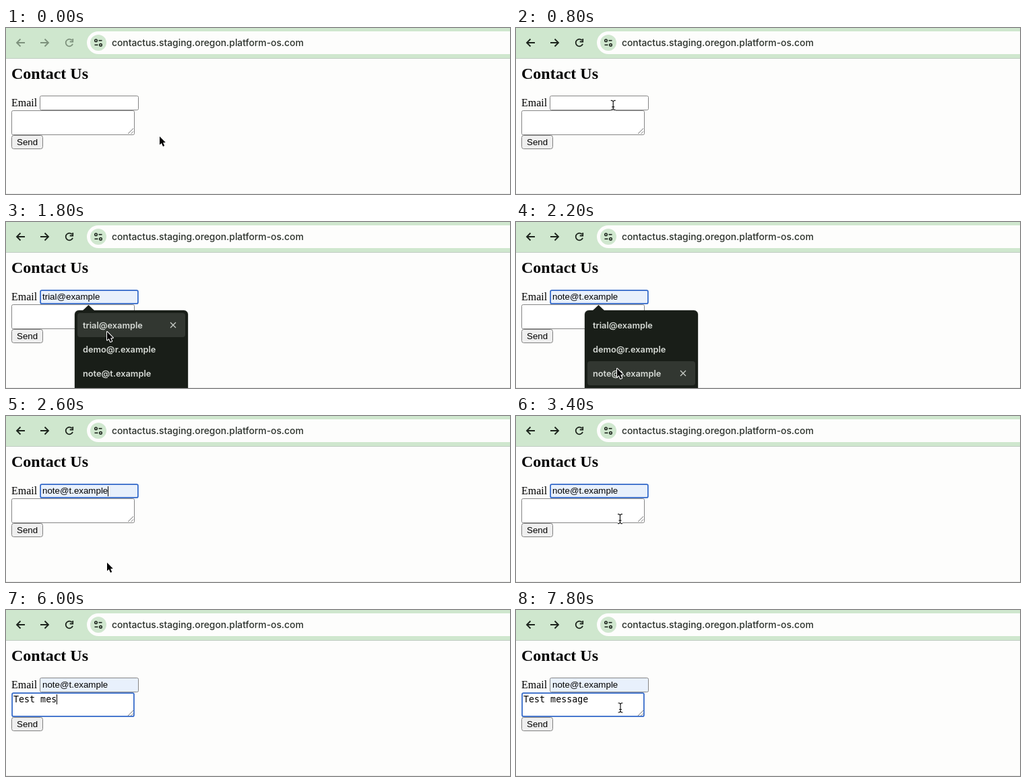
These frames come from a looping animation (748 px wide and 248 px high, 8000 ms). An HTML page with a canvas:

```html
<!DOCTYPE html>
<html lang="en">
<head>
<meta charset="utf-8">
<title>Contact form</title>
<style>
  html, body { margin: 0; width: 100%; height: 100%; overflow: hidden; background: #fdfdfc; }
  canvas { display: block; width: 748px; height: 248px; }
</style>
</head>
<body>
<canvas id="stage" width="748" height="248"></canvas>
<script>
const ctx = document.getElementById('stage').getContext('2d');
const LOOP = 8000, STEP = 200, BLINK = 450;
const ACTIVATE = 800, FOCUS_EMAIL = 1000, OPEN = 1200, PICK = 2600, FOCUS_MESSAGE = 3600, MOUSE_BACK = 7800;
const SANS = '13.333px "Liberation Sans", sans-serif';
const MONO = '13.333px "DejaVu Sans Mono", monospace';
const SERIF = '"Liberation Serif", serif';
const UI = 'Inter, sans-serif';
const INK = '#1c241c', PAPER = '#fdfdfc';

const SUGGESTIONS = ['trial@example', 'demo@r.example', 'note@t.example'];
const ITEM_TOP = 136, ITEM_HEIGHT = 36;
const EMAIL = { x: 50, y: 101, w: 147, h: 22 };
const MESSAGE = { x: 8, y: 123, w: 183, h: 37 };

const typing = [
  { time: 4400, text: 'T' },
  { time: 4800, text: 'Test' },
  { time: 5600, text: 'Test m' },
  { time: 6000, text: 'Test mes' },
  { time: 6200, text: 'Test mess' },
  { time: 6400, text: 'Test message' }
];
const caretResets = [FOCUS_EMAIL, PICK, FOCUS_MESSAGE, ...typing.map(key => key.time)];

const moves = [
  { from: 0, to: 1000, x: 134.5, y: 110 },
  { from: OPEN, to: 1800, x: 150, y: 164 },
  { from: 1800, to: 2200, x: 150, y: 219 },
  { from: PICK, to: FOCUS_MESSAGE, x: 155, y: 146 }
];

function pointerAt(t) {
  let x = 228, y = 162;
  for (const move of moves) {
    const k = Math.min(1, Math.max(0, (t - move.from) / (move.to - move.from)));
    const ease = k * k * (3 - 2 * k);
    x += (move.x - x) * ease;
    y += (move.y - y) * ease;
  }
  return { x, y };
}

const inside = (p, r) => p.x > r.x && p.x < r.x + r.w && p.y > r.y && p.y < r.y + r.h;

function stateAt(t) {
  const mouse = pointerAt(t);
  const open = t >= OPEN && t < PICK;
  const hover = open ? Math.floor((mouse.y - ITEM_TOP) / ITEM_HEIGHT) : -1;
  const overMenu = open && mouse.y > MESSAGE.y;
  const lastReset = Math.max(...caretResets.filter(time => time <= t));
  return {
    mouse, open, hover,
    active: t >= ACTIVATE,
    focus: t >= FOCUS_MESSAGE ? MESSAGE : t >= FOCUS_EMAIL ? EMAIL : null,
    email: SUGGESTIONS[t >= PICK ? 2 : hover] || '',
    message: typing.reduce((text, key) => key.time <= t ? key.text : text, ''),
    caret: hover < 0 && Math.floor((t - lastReset) / BLINK) % 2 === 0,
    beam: !overMenu && (inside(mouse, EMAIL) || inside(mouse, MESSAGE)),
    mouseShown: t < typing[0].time || t >= MOUSE_BACK
  };
}

function text(str, x, y, font, color = '#000') {
  ctx.font = font;
  ctx.fillStyle = color;
  ctx.fillText(str, x, y);
  return x + ctx.measureText(str).width;
}

function paint(fill, stroke, width) {
  if (fill) { ctx.fillStyle = fill; ctx.fill(); }
  if (stroke) { ctx.strokeStyle = stroke; ctx.lineWidth = width; ctx.stroke(); }
}

function box(x, y, w, h, r, fill, stroke, width = 1) {
  ctx.beginPath();
  ctx.roundRect(x, y, w, h, r);
  paint(fill, stroke, width);
}

function disc(x, y, r, fill, stroke) {
  ctx.beginPath();
  ctx.arc(x, y, r, 0, Math.PI * 2);
  paint(fill, stroke, 1.5);
}

function trace(points) {
  points.forEach(([x, y], i) => i ? ctx.lineTo(x, y) : ctx.moveTo(x, y));
}

function lines(color, width, ...polylines) {
  ctx.beginPath();
  polylines.forEach(trace);
  paint(null, color, width);
}

function navArrow(x, dir, color) {
  const tip = x + 6 * dir;
  lines(color, 1.8, [[x - 6 * dir, 22], [tip, 22]],
    [[x + .5 * dir, 16.5], [tip, 22], [x + .5 * dir, 27.5]]);
}

function toolbar(active) {
  const color = active ? INK : '#7d917c';
  ctx.fillStyle = '#cfe7ce';
  ctx.fillRect(0, 0, 748, 45);
  ctx.fillStyle = '#c3cdc4';
  ctx.fillRect(0, 45, 748, 1);
  box(120, 5, 680, 34, 17, PAPER);
  disc(137, 22, 12, '#d0e7cf');

  navArrow(22, -1, color);
  navArrow(57, 1, color);
  ctx.beginPath();
  ctx.arc(94, 22, 5.3, .35, Math.PI * 1.75);
  paint(null, color, 1.8);
  lines(color, 1.8, [[99.2, 16], [99.2, 20.5], [94.7, 20.5]]);

  for (const side of [-1, 1]) {
    const y = 22 + 3.3 * side;
    disc(137 + 3.5 * side, y, 1.8, null, INK);
    lines(INK, 1.6, [[137 - .5 * side, y], [137 - 5.5 * side, y]]);
  }
  text('contactus.staging.oregon.platform-os.com', 157, 27, '500 13.85px ' + UI, '#2a302a');
}

function field({ x, y, w, h }, focused, fill) {
  const inset = focused ? 1.1 : .5;
  box(x + inset, y + inset, w - 2 * inset, h - 2 * inset, 2, fill,
    focused ? '#2f66c8' : '#858585', focused ? 1.7 : 1);
}

function caret(x, y) {
  ctx.fillStyle = '#000';
  ctx.fillRect(Math.round(x), y, 1, 15);
}

function form({ focus, email, message, caret: caretOn }) {
  text('Contact Us', 8, 75.5, 'bold 24px ' + SERIF);
  text('Email', 8, 117, '16px ' + SERIF);
  field(EMAIL, focus === EMAIL, email ? '#e8f0fc' : '#fff');
  const emailEnd = text(email, 54, 116, SANS);

  field(MESSAGE, focus === MESSAGE, '#fff');
  lines('#777', 1, [[181, 158], [189, 150]], [[185.5, 158], [189, 154.5]]);
  const messageEnd = text(message, 11, 138, MONO);

  if (caretOn && focus === EMAIL) caret(emailEnd, 105);
  if (caretOn && focus === MESSAGE) caret(messageEnd, 126);

  box(8.5, 160.5, 46, 20, 3, '#efefef', '#808080');
  text('Send', 16, 175, SANS);
}

function popup(hover) {
  const dark = '#191e18';
  box(102, 132, 168, 140, 6, dark, 'rgba(25,30,24,.35)');
  ctx.beginPath();
  trace([[113, 133], [122.5, 124], [132, 133]]);
  paint(dark);

  SUGGESTIONS.forEach((item, i) => {
    const top = ITEM_TOP + i * ITEM_HEIGHT, mid = top + ITEM_HEIGHT / 2;
    if (i === hover) {
      box(106, top, 160, ITEM_HEIGHT, 4, '#323731');
      lines('#c9cec8', 1.3, [[244, mid - 4], [252, mid + 4]], [[252, mid - 4], [244, mid + 4]]);
    }
    text(item, 114, mid + 4.7, '600 12.8px ' + UI, '#d6dad5');
  });
}

function arrowPointer() {
  ctx.beginPath();
  trace([[0, 0], [0, 12.5], [2.8, 10], [5, 15], [7.2, 14], [5.1, 9.2], [8.8, 9]]);
  ctx.closePath();
  paint(null, '#fff', 2);
  paint('#000');
}

function beamPointer() {
  const serif = side => [-3.5, -1.5, 0, 1.5, 3.5].map(x => [x, side * (x ? 7 : 5.5)]);
  const beam = [serif(-1), [[0, -5.5], [0, 5.5]], serif(1), [[-2, 2.5], [2, 2.5]]];
  lines('#fff', 3, ...beam);
  lines('#111', 1.2, ...beam);
}

function draw(t) {
  const state = stateAt(t);
  ctx.fillStyle = PAPER;
  ctx.fillRect(0, 0, 748, 248);
  ctx.fillStyle = '#ececeb';
  ctx.fillRect(0, 247, 748, 1);
  toolbar(state.active);
  form(state);
  if (state.open) popup(state.hover);
  if (state.mouseShown) {
    ctx.save();
    ctx.translate(state.mouse.x, state.mouse.y);
    ctx.lineJoin = 'round';
    state.beam ? beamPointer() : arrowPointer();
    ctx.restore();
  }
}

const start = performance.now();
function tick() {
  const t = (performance.now() - start) % LOOP;
  draw(Math.floor(t / STEP) * STEP);
  requestAnimationFrame(tick);
}
tick();
</script>
</body>
</html>
```
